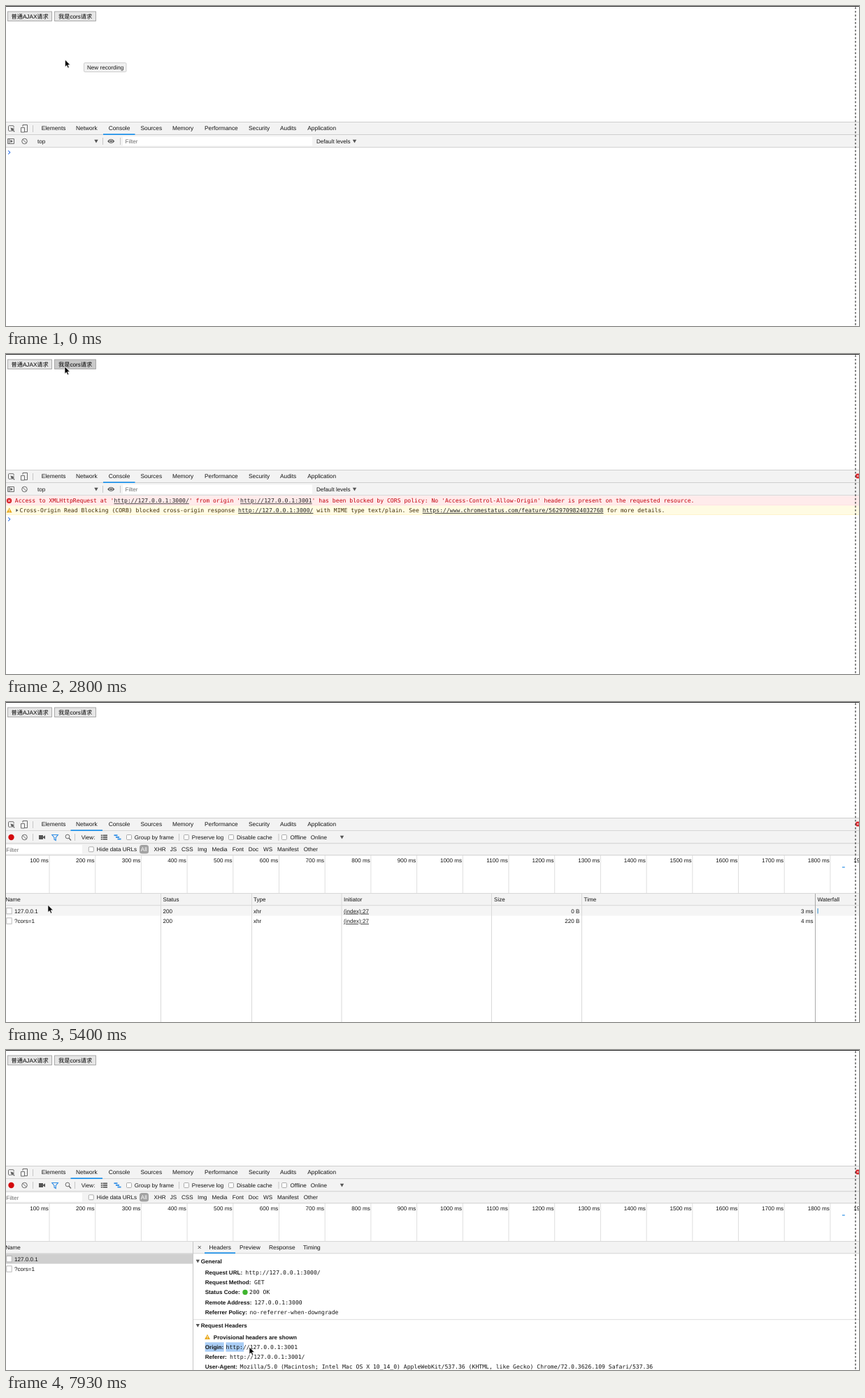
An HTML page for the animation above (8000 ms loop, 1220 px wide and 459 px high).

```html
<!DOCTYPE html>
<html lang="zh">
<head>
<meta charset="utf-8">
<title>CORS demo</title>
<style>
html, body { margin: 0; width: 100%; height: 100%; overflow: hidden; background: #fff; }
svg { display: block; text-rendering: geometricPrecision; }
text { font: 8.1px "Liberation Sans", "Noto Sans CJK SC", "Noto Sans CJK", sans-serif; fill: #151515; white-space: pre; }
.tab { font-size: 8.35px; }
.btn { font-size: 8.2px; fill: #000; }
.b { font-weight: bold; }
.m { font: 8.115px "DejaVu Sans Mono", monospace; }
.u { text-decoration: underline; fill: #222; }
.end { text-anchor: end; }
.i { fill: none; stroke: #6a6a6a; }
</style>
</head>
<body>
<svg id="stage" width="1220" height="459" viewBox="0 0 1220 459"></svg>
<script>
const BAR = '#f3f3f3', EDGE = '#c6c6c6', BLUE = '#1a8fe8';
const rect = (x, y, w, h, fill, more = '') => `<rect x="${x}" y="${y}" width="${w}" height="${h}" fill="${fill}" ${more}/>`;
const text = (x, y, s, cls = '', more = '') => `<text x="${x}" y="${y}" class="${cls}" ${more}>${s}</text>`;
const path = (d, more = 'class="i"') => `<path d="${d}" ${more}/>`;
const fill = c => `fill="${c}"`;
const group = (id, ...parts) => `<g id="${id}">${parts.join('')}</g>`;
const link = s => `<tspan class="u">${s}</tspan>`;
const hline = (y, x = 0, c = EDGE) => rect(x, y, 1220 - x, .8, c);
const vline = (x, y, h, c = EDGE) => rect(x, y, 1, h, c);
const labels = (y, cls, list) => list.map(([x, s]) => text(x, y, s, cls)).join('');
const down = (x, y, c = '#555') => path(`M${x - 2.7} ${y - 2.2}h5.4l-2.7 4.6z`, fill(c));
const check = (x, y) => rect(x - 3.5, y - 3.5, 7, 7, '#fff', 'stroke="#999" stroke-width=".8" rx="1.2"');
const fileIcon = y => rect(.8, y, 7.4, 8.4, '#fff', 'stroke="#aaa" stroke-width=".8"');
const clearIcon = '<circle cx="26.5" cy="194" r="3.8" class="i"/>' + path('M23.9 191.3l5.3 5.4');
const warn = (x, y) => path(`M${x} ${y - 3.8}l3.9 7.2h-7.8z`, 'fill="#e9a614"') + rect(x - .5, y - 1.5, 1, 2.5, '#fff') + rect(x - .5, y + 1.6, 1, .9, '#fff');
const prompt = (id, y) => group(id, path(`M3.2 ${y - 2.6}l2.6 2.6-2.6 2.6`, 'fill="none" stroke="#3a7be8" stroke-width="1.1"'));
const button = (id, x, w, tx, s) =>
  rect(x + .5, 8, w - 1, 13.5, '#e6e6e6', `id="${id}" stroke="#a3a3a3" stroke-width=".9"`) + text(tx, 17.7, s, 'btn');

const page =
  button('ajax', 2, 64, 7.5, '普通AJAX请求') + button('cors', 69, 60, 75, '我是cors请求') +
  group('tip', rect(111.5, 81.5, 60.5, 13, '#f1f1f1', 'rx="1.5" stroke="#cfcfcf"'), text(116, 90.8, 'New recording'));

const tabs = rect(0, 166.4, 1220, 36.4, BAR) + hline(166) + hline(184) +
  path('M7 179.3H4.4q-.9 0-.9-.9v-5.8q0-.9.9-.9h5.8q.9 0 .9.9v2') +
  path('M6.5 174.5l1.7 6 1.2-2 2.2 2.2 1-1-2.2-2.2 2-1.2z', fill('#5f5f5f')) +
  path('M24 173v-2.5h6.5v10H27M21.5 174.5h5v6.5h-5z') +
  vline(38, 171, 10) +
  labels(178.3, 'tab', [[50.7, 'Elements'], [100, 'Network'], [146.7, 'Console'], [192.5, 'Sources'], [238, 'Memory'],
    [284, 'Performance'], [347, 'Security'], [392, 'Audits'], [431.3, 'Application']]);

const ROW_ERR = "Access to XMLHttpRequest at '" + link('http://127.0.0.1:3000/') + "' from origin '" + link('http://127.0.0.1:3001') +
  "' has been blocked by CORS policy: No 'Access-Control-Allow-Origin' header is present on the requested resource.";
const ROW_WARN = 'Cross-Origin Read Blocking (CORB) blocked cross-origin response ' + link('http://127.0.0.1:3000/') +
  ' with MIME type text/plain. See ' + link('https://www.chromestatus.com/feature/5629709824032768') + ' for more details.';

const consolePanel = group('console',
  hline(202.4),
  path('M2.5 190.5h9v7h-9zM4.5 190.5v7'), path('M6.2 191.8l3.8 2.2-3.8 2.2z', fill('#5f5f5f')),
  clearIcon, text(45, 196.8, 'top'), down(129, 194), vline(138, 189, 10),
  path('M145 194q5.2-6.6 10.4 0q-5.2 6.6-10.4 0z', fill('#5f5f5f')),
  '<circle cx="150.2" cy="194" r="2" fill="#5f5f5f" stroke="#fff" stroke-width=".8"/>',
  vline(163, 189, 10), rect(167, 187.5, 271, 13, '#fff'), text(170.5, 197, 'Filter', '', 'style="fill:#6f6f6f"'),
  text(444, 196.8, 'Default levels'), down(498.5, 194),
  prompt('p0', 210),
  group('errors',
    rect(0, 203.2, 1220, 14, '#ffebeb'), hline(216.6, 0, '#ffd8d8'),
    rect(0, 217.4, 1220, 13.4, '#fffbe3'), hline(230.1, 0, '#fff3c4'),
    '<circle cx="4.5" cy="210.5" r="3.7" fill="#d9252b"/>', path('M3 209l3 3m0-3l-3 3', 'stroke="#fff"'),
    text(12.8, 213.4, ROW_ERR, 'm', 'style="fill:#c4000c"'),
    warn(4.7, 224.2), path('M14.3 222l3.2 2.2-3.2 2.2z', 'fill="#555"'),
    text(19.6, 227, ROW_WARN, 'm', 'style="fill:#43300a"')),
  prompt('p1', 237),
  group('success', text(12.8, 240.6, 'success', 'm'), hline(243.4, 0, '#ececec'), prompt('p2', 250.7)));

let ticks = '';
for (let i = 0; i < 19; i++) {
  const x = 62 + i * 65.7;
  ticks += rect(x - .5, 220, 1, 54, '#dedede') + text(x - 1.2, 230.3, (i + 1) * 100 + ' ms', 'end');
}

const cells = (y, status, size, time) =>
  text(224.5, y, status) + text(354, y, 'xhr') + text(483, y, '(index):27', 'u') + text(820.5, y, size, 'end') + text(1154.5, y, time, 'end');

const table = group('table',
  labels(286.3, '', [[224.5, 'Status'], [354, 'Type'], [483, 'Initiator'], [698, 'Size'], [826.5, 'Time'], [1160.5, 'Waterfall']]),
  [221, 351, 479.5, 694, 823].map(x => vline(x, 275, 184, '#d9d9d9')).join(''), vline(1157, 275, 184, '#aaa'),
  cells(302.7, 200, '0 B', '3 ms'), cells(317, 200, '220 B', '4 ms'), rect(1160.5, 296, 1.2, 7.5, '#4d9bd0'));

const field = (y, key, x, value) => text(284.7, y, key + ':', 'b') + text(x, y, value, 'm');
const section = (y, s) => down(274.3, y - 3) + text(278.7, y, s, 'b');

const details = group('details',
  rect(268, 292.4, 952, 167, '#fff'), vline(267, 275, 184),
  path('M274.7 281l4 4m0-4l-4 4', 'stroke="#555"'),
  labels(286.3, 'tab', [[290.5, 'Headers'], [334, 'Preview'], [376, 'Response'], [425, 'Timing']]),
  rect(284, 290.3, 44, 1.7, BLUE),
  section(306, 'General'),
  field(322, 'Request URL', 342.3, 'http://127.0.0.1:3000/'),
  field(336.3, 'Request Method', 355, 'GET'),
  field(350.4, 'Status Code', 348, '200 OK'), '<circle cx="342" cy="347.5" r="3.7" fill="#3fb52f"/>',
  field(364.6, 'Remote Address', 355.3, '127.0.0.1:3000'),
  field(379, 'Referrer Policy', 348.5, 'no-referrer-when-downgrade'),
  hline(386.3, 268, '#d6d6d6'), section(398.3, 'Request Headers'),
  warn(288, 411.6), text(296.8, 414.5, 'Provisional headers are shown', 'b'),
  rect(284.7, 419.3, 0, 13.4, '#a9cdf5', 'id="selKey"'), rect(314.5, 419.3, 0, 13.4, '#a9cdf5', 'id="selVal"'),
  field(428.8, 'Origin', 314.5, 'http://127.0.0.1:3001'),
  field(443, 'Referer', 320, 'http://127.0.0.1:3001/'),
  field(457.2, 'User-Agent', 334.5, 'Mozilla/5.0 (Macintosh; Intel Mac OS X 10_14_0) AppleWebKit/537.36 (KHTML, like Gecko) Chrome/72.0.3626.109 Safari/537.36'));

const network = group('network',
  rect(0, 184.8, 1220, 35.2, BAR), rect(0, 220, 1220, 239, '#fff'), hline(202.4), hline(219.4),
  '<circle cx="7.5" cy="194" r="4.2" fill="#d3090d"/>', clearIcon,
  path('M47 191h6v6h-6zM53 193.5l3-2.2v5.4l-3-2.2z', 'fill="#555"'), vline(38, 189, 10),
  path('M65.8 190.5h8.6l-3.2 4v4l-2.2-1.4v-2.6z', 'fill="none" stroke="#2a8be6" stroke-width="1.1"'),
  '<circle cx="88" cy="193" r="2.9" class="i"/>', path('M90 195.2l3 3.2', 'class="i" stroke-width="1.4"'),
  vline(98, 189, 10), vline(247, 189, 10), vline(389.5, 189, 10),
  text(107.8, 196.8, 'View:'),
  [190.5, 193.2, 195.9].map(y => rect(135.8, y, 2, 1.7, '#555') + rect(138.5, y, 6.5, 1.7, '#555')).join(''),
  [0, 1, 2].map(k => rect(154.5 + k * 2.5, 190.3 + k * 2.7, 5, 1.8, '#2a8be6')).join(''),
  [176, 258, 322, 398].map(x => check(x, 194)).join(''),
  labels(196.8, '', [[183.8, 'Group by frame'], [265.8, 'Preserve log'], [330, 'Disable cache'], [406.5, 'Offline'], [435.7, 'Online']]),
  down(480.5, 194),
  rect(0, 205, 109, 12.5, '#fff'), text(.3, 214.5, 'Filter', '', 'style="fill:#6f6f6f"'),
  check(121.8, 211.3), rect(191, 205, 13, 12.5, '#a2a2a2', 'rx="3.5"'), text(192.8, 214.3, 'All', '', 'style="fill:#fff"'),
  labels(214.3, '', [[129.8, 'Hide data URLs'], [211.5, 'XHR'], [234.7, 'JS'], [251, 'CSS'], [274, 'Img'], [294.5, 'Media'],
    [323.7, 'Font'], [346.7, 'Doc'], [368, 'WS'], [388, 'Manifest'], [425.7, 'Other']]),
  ticks, rect(1196, 236.3, 3.8, 1.4, '#4aa0ea'),
  hline(274), rect(0, 274.8, 1220, 17, BAR), hline(291.6, 0, '#b8b8b8'),
  rect(0, 292.4, 1220, 14.2, '#f5f5f5', 'id="row"'),
  text(-.8, 286.3, 'Name'), fileIcon(295.5), fileIcon(309.8),
  text(12, 302.7, '127.0.0.1', '', 'id="host"'), text(12, 317, '?cors=1'),
  table, details,
  group('urlTip', rect(73.5, 301.5, 89, 15, '#f1f1f1', 'rx="1.5" stroke="#cfcfcf"'),
    text(79, 311.8, 'http://127.0.0.1:3000/', 'tab')));

const cursor = group('cursor',
  path('M0 0V10.4L2.4 8.2 4 12 5.8 11.3 4.2 7.6H7.4Z', 'id="arrow" stroke="#fff" stroke-width=".7"'),
  path('M-1.2 7.5V1a1.1 1.1 0 0 1 2.2 0v3.3l4.5 1q1.2.4 1 1.8l-.8 4.9H.5L-3.2 8q-.8-1.2.2-1.6.8-.2 1.8 1.1z',
    'id="hand" fill="#fff" stroke="#111" stroke-width=".9"'));

const stage = document.getElementById('stage');
stage.innerHTML = page + tabs + consolePanel + network + rect(139, 183.3, 45.5, 1.7, BLUE, 'id="slider"') +
  group('badge', '<circle cx="1218.3" cy="175" r="3.5" fill="#d9252b"/>', path('M1217 173.7l2.6 2.6m0-2.6l-2.6 2.6', 'stroke="#fff" stroke-width=".8"')) +
  rect(0, 0, 1220, 1, '#222') +
  path('M1215 1.5V459', 'stroke="#333" stroke-width="1.2" stroke-dasharray="2.7"') + cursor;

const el = {};
stage.querySelectorAll('[id]').forEach(e => el[e.id] = e);
const show = (id, on) => el[id].style.display = on ? '' : 'none';
const set = (id, name, v) => el[id].setAttribute(name, v);
const clamp = v => Math.max(0, Math.min(1, v));

// Pointer stops: time, x, y
const stops = [
  [0, 84.5, 77], [70, 84.5, 77], [330, 22, 188], [470, 24, 188], [730, 42, 16], [1200, 42, 16],
  [1550, 83, 18], [1800, 83, 18], [2150, 60, 214], [2300, 60, 214], [2550, 84, 18], [3050, 84, 18],
  [3400, 150, 205], [3600, 240, 214], [3800, 212.5, 165], [3930, 180, 138], [4270, 110.5, 179], [4900, 110.5, 179],
  [5500, 56, 300], [5700, 52.5, 303], [6300, 52.5, 303], [7200, 285, 400], [7500, 285, 426], [7730, 285, 426],
  [7930, 348, 426], [8000, 348, 426]];

function pointer(t) {
  const i = stops.findIndex(s => s[0] > t);
  const [t0, x0, y0] = stops[i - 1], [t1, x1, y1] = stops[i];
  const k = (t - t0) / (t1 - t0), e = k * k * (3 - 2 * k);
  return [x0 + (x1 - x0) * e, y0 + (y1 - y0) * e];
}

function draw(t) {
  const [x, y] = pointer(t);
  const onRow = x < 267 && y > 292 && y < 320;
  const hand = onRow || (t > 4000 && y > 167 && y < 184);
  const failed = t >= 1130, passed = t >= 2930, net = t >= 4400, open = t >= 6060, drag = t >= 7790;
  set('cursor', 'transform', `translate(${x} ${y})`);
  show('arrow', !hand);
  show('hand', hand);

  el.tip.style.opacity = clamp((270 - t) / 130);
  set('ajax', 'fill', t >= 1000 && t < 1130 ? '#c9c9c9' : '#e6e6e6');
  set('cors', 'fill', t >= 2730 && t < 2860 ? '#c9c9c9' : '#e6e6e6');

  show('console', !net);
  show('network', net);
  show('errors', failed);
  show('badge', failed);
  show('success', passed);
  show('p0', !failed);
  show('p1', failed && !passed);
  set('slider', 'x', 139 - 46.5 * (1 - (1 - clamp((t - 4400) / 150)) ** 2.6));

  show('table', !open);
  show('details', open);
  set('row', 'width', open ? 267 : 1220);
  set('row', 'fill', drag ? '#cfcfcf' : open ? '#1e88ee' : onRow ? '#ebf2fb' : '#f5f5f5');
  const active = open && !drag;
  el.host.style.fill = active ? '#fff' : '';
  el.host.style.fontWeight = active ? 'bold' : '';
  el.urlTip.style.opacity = t < 5800 ? 0 : clamp((6095 - t) / 95);

  const end = drag ? 284.7 + (x - 285) * .88 : 0;
  set('selKey', 'width', Math.max(0, Math.min(end, 311.7) - 284.7));
  set('selVal', 'width', Math.max(0, end - 314.5));
}

function tick() {
  draw(performance.now() % 8000);
  requestAnimationFrame(tick);
}
tick();
</script>
</body>
</html>
```
